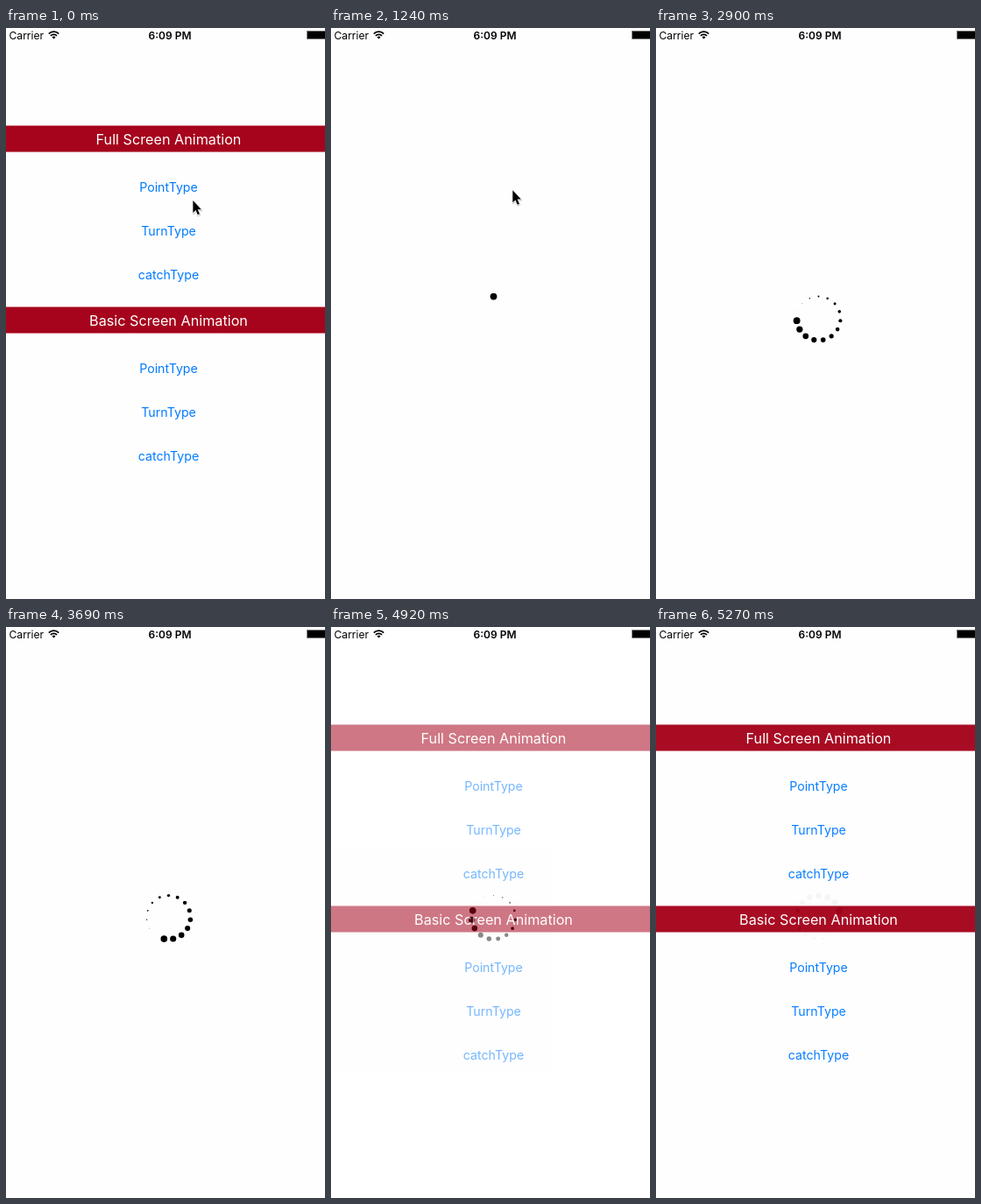
These frames come from a looping animation (364 px wide and 652 px high, 5760 ms). An HTML page:

```html
<!DOCTYPE html>
<html lang="en">
<head>
<meta charset="utf-8">
<title>Loading indicator demo</title>
<style>
  html, body { margin: 0; width: 100%; height: 100%; overflow: hidden; background: #fefefe; }
  svg { display: block; width: 364px; height: 652px; font-family: Inter, "Open Sans", sans-serif; }
  .band { fill: #a5041c; }
  .title { fill: #fff; font-size: 16.2px; text-anchor: middle; }
  .link { fill: #007aff; font-size: 14.2px; text-anchor: middle; }
  .status { font-size: 12.1px; }
  .clock { font-size: 12px; font-weight: 600; text-anchor: middle; }
</style>
</head>
<body>
<svg viewBox="0 0 364 652">
  <rect width="364" height="652" fill="#fefefe"/>
  <g id="menu"></g>
  <g id="cover" opacity="0">
    <rect width="364" height="652" fill="#fefefe"/>
    <g id="ring"></g>
  </g>
  <g id="statusBar">
    <text class="status" x="3.5" y="12.6">Carrier</text>
    <g fill="none" stroke="#000" stroke-width="1.7">
      <path d="M48.8 6.6A8 8 0 0 1 60.2 6.6"/>
      <path d="M50.9 8.9A5 5 0 0 1 58.1 8.9"/>
      <path d="M54.5 12.5L52.5 10.5A2.8 2.8 0 0 1 56.5 10.5Z" fill="#000" stroke="none"/>
    </g>
    <text class="clock" x="187" y="12.6">6:09 PM</text>
    <rect x="343.5" y="3.5" width="24" height="9" fill="#000" stroke="#777" stroke-width=".6"/>
  </g>
  <g id="cursor">
    <path d="M0 0V14L3.2 11.1 5.4 16.4 7.6 15.4 5.4 10.3H9.6Z" fill="#000" opacity=".18"
          stroke="#000" stroke-width="2" stroke-linejoin="round" transform="translate(.4 1)"/>
    <path d="M0 0V14L3.2 11.1 5.4 16.4 7.6 15.4 5.4 10.3H9.6Z" fill="#000"
          stroke="#fff" stroke-width="1.4" stroke-linejoin="round" paint-order="stroke"/>
  </g>
</svg>
<script>
const LOOP = 5760;
const FRAME = 87.55;      // the picture is held this long
const DOTS = 15;
const DOT_DELAY = 64.2;   // lag between neighbouring dots
const SPIN_START = 1215;
const DOT_RADIUS = 4;

// [time, cover opacity]
const FADE = [[965, 0], [1235, 1], [4574, 1], [4657, .86], [4920, .46], [5270, .03]];
// [time, x, y] of the pointer tip
const PATH = [
  [0, 213.5, 197], [90, 212, 196.6], [355, 207.3, 195.2], [960, 207.3, 195.2],
  [1235, 207.3, 185.3], [1600, 207.3, 185.3], [1850, 255, 300],
  [2118, 313, 444], [2731, 344, 634], [2812, 344, 670]
];

const byId = id => document.getElementById(id);
const cover = byId("cover"), ring = byId("ring"), cursor = byId("cursor");

function section(title, top) {
  const links = ["PointType", "TurnType", "catchType"];
  return `<rect class="band" x="0" y="${top}" width="364" height="30"/>
    <text class="title" x="185.5" y="${top + 21}">${title}</text>` +
    links.map((name, i) =>
      `<text class="link" x="185.5" y="${top + 75.6 + 50 * i}">${name}</text>`).join("");
}
byId("menu").innerHTML =
  section("Full Screen Animation", 111.5) + section("Basic Screen Animation", 318.5);

ring.innerHTML = Array.from({ length: DOTS }, (_, i) => {
  const a = i / DOTS * 2 * Math.PI;
  const x = 185.5 + 25 * Math.sin(a), y = 331.6 - 25 * Math.cos(a);
  return `<circle cx="${x.toFixed(2)}" cy="${y.toFixed(2)}" r="0"/>`;
}).join("");
const dots = [...ring.children];

// Linear interpolation of column `col` in a list of keys
function track(keys, t, col) {
  const next = keys.findIndex(k => k[0] > t);
  if (next === 0) return keys[0][col];
  if (next < 0) return keys[keys.length - 1][col];
  const a = keys[next - 1], b = keys[next];
  return a[col] + (b[col] - a[col]) * (t - a[0]) / (b[0] - a[0]);
}

function held(t) {
  const start = t < 900 ? 88 : 972;
  const step = Math.floor((t - start) / FRAME);
  return Math.min(5270, Math.max(0, start + 8 + step * FRAME));
}

function dotScale(i, t) {
  const age = t - SPIN_START - i * DOT_DELAY;
  return age < 0 ? 0 : 1 - age / (DOTS * DOT_DELAY) % 1;
}

function draw(time) {
  const t = held(time);
  cover.setAttribute("opacity", track(FADE, t, 1));
  dots.forEach((dot, i) => dot.setAttribute("r", DOT_RADIUS * dotScale(i, t)));
  cursor.setAttribute("transform", `translate(${track(PATH, t, 1)} ${track(PATH, t, 2)})`);
}

const origin = performance.now();
function tick() {
  draw((performance.now() - origin) % LOOP);
  requestAnimationFrame(tick);
}
tick();
</script>
</body>
</html>
```
